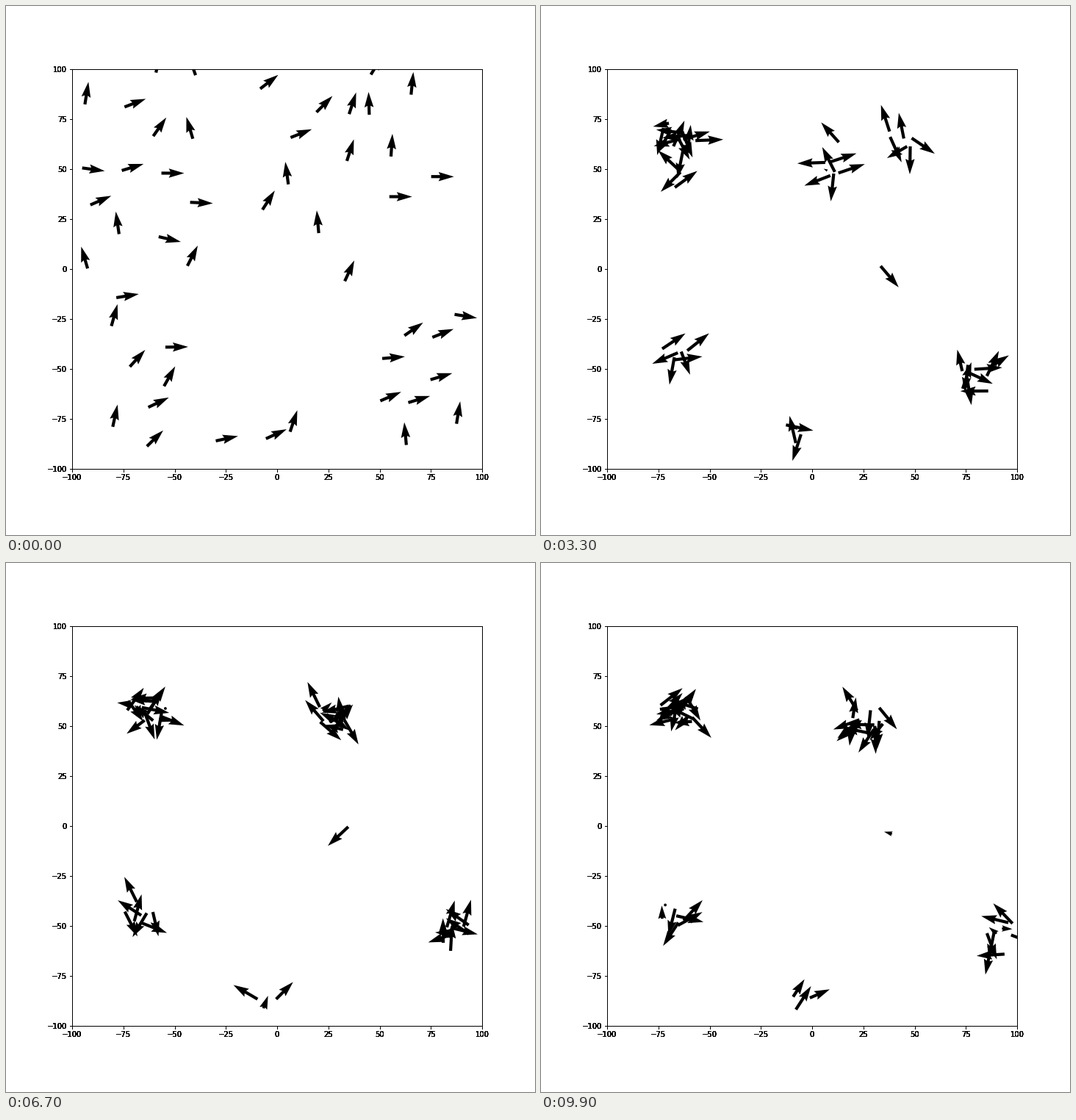
A matplotlib script that plays this animation: 720x720 px, repeating every 10 s.

```python
import numpy as np
import matplotlib.pyplot as plt
from matplotlib.animation import FuncAnimation

FRAMES, INTERVAL = 100, 100
SPEED = 1.6                  # units per frame while gathering
TURN, JITTER = 0.6, 0.35     # heading and position noise per frame
BOX = [0.125, 0.125, 0.775, 0.755]
LABEL_LAYERS = 7

rng = np.random.default_rng(5)

# Each flock: size, start centre, start half-extent, final radius,
# then its centre at the key times.
KEYS = [24, 42, 67, 99]
FLOCKS = [
    (16, (-62, 42), (34, 57), 10, [(-65, 67), (-64, 64), (-64, 57), (-65, 58)]),
    (8, (10, 55), (28, 42), 10, [(5, 53), (24, 60), (29, 57), (27, 55)]),
    (6, (64, 62), (20, 36), 9, [(52, 66), (26, 60), (29, 57), (27, 55)]),
    (7, (-70, -57), (17, 35), 7, [(-67, -39), (-67, -41), (-68, -43), (-68, -45)]),
    (9, (71, -56), (24, 38), 9, [(77, -54), (85, -56), (90, -56), (94, -56)]),
    (3, (-9, -83), (24, 4), 7, [(-10, -80), (-9, -85), (-4, -87), (-5, -88)]),
    (1, (33, -6), (0, 0), 0, [(33, 2), (33, 1), (36, 0), (39, -4)]),
]


def scatter(n):
    """n evenly spread points in the square from -1 to 1."""
    steps = np.arange(1, n + 1)[:, None] * [0.7549, 0.5698]
    return 2 * ((rng.random(2) + steps) % 1) - 1


def fly(n, start, extent, radius, path):
    """Positions of one flock: frame, boid, (x, y)."""
    turn = rng.uniform(0, 2 * np.pi, n)
    reach = radius * np.sqrt(rng.random(n))
    pos = start + scatter(n) * extent
    out = [pos]
    for t in range(1, FRAMES):
        centre = [np.interp(t, KEYS, c) for c in zip(*path)]
        turn = turn + rng.normal(0, 0.08, n)
        spot = centre + reach[:, None] * np.c_[np.cos(turn), np.sin(turn)]
        step = spot - pos
        dist = np.hypot(*step.T)[:, None] + 1e-9
        pos = (pos + step * np.minimum(0.3, SPEED / dist)
               + rng.normal(0, JITTER, (n, 2)))
        out.append(pos)
    return np.array(out)


def velocities(n):
    """Wandering headings, with lengths in pixels that sometimes collapse."""
    t = np.arange(FRAMES)[:, None]
    walk = rng.normal(0, TURN, (FRAMES, n))
    walk[0] = np.radians(rng.uniform(-15, 110, n))
    head = np.cumsum(walk, axis=0)

    mood = np.zeros((FRAMES, n))
    for i in range(1, FRAMES):
        mood[i] = 0.85 * mood[i - 1] + rng.normal(0, 0.53, n)
    cap = np.interp(t, [0, 12, 24], [31, 49, 38])
    length = cap * np.clip(1.4 + 0.7 * mood, 0, 1)
    return length * np.cos(head), length * np.sin(head)


pos = np.concatenate([fly(*flock) for flock in FLOCKS], axis=1)
u, v = velocities(pos.shape[1])

fig = plt.figure(figsize=(10, 10), dpi=72, facecolor="white")
# Stacked axes give the heavy tick labels.
for n in range(LABEL_LAYERS):
    ax = fig.add_axes(BOX, xlim=(-100, 100), ylim=(-100, 100), label=str(n))
    ax.patch.set_visible(False)

arrows = ax.quiver(*pos[0].T, u[0], v[0], color="black", angles="uv",
                   scale=1, scale_units="dots")
ax.set(xlim=(-100, 100), ylim=(-100, 100))


def update(i):
    arrows.set_offsets(pos[i])
    arrows.set_UVC(u[i], v[i])
    return arrows,


anim = FuncAnimation(fig, update, frames=FRAMES, interval=INTERVAL,
                     repeat=True, repeat_delay=0)
plt.show()
```
